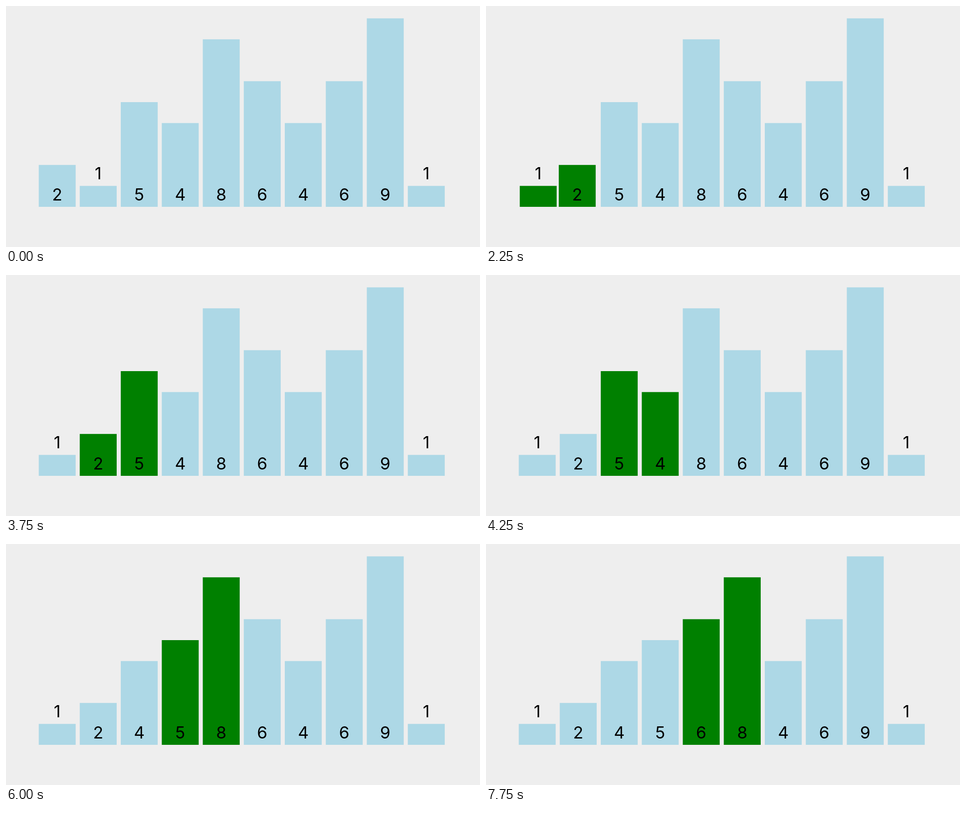
Recreate the animation shown at these times as an HTML page. Size 1049 px wide and 534 px high, loop 8000 ms.

```html
<!DOCTYPE html>
<html lang="en">
<head>
<meta charset="utf-8">
<title>Bubble sort</title>
<style>
  html, body { margin: 0; width: 100%; height: 100%; overflow: hidden; background: #eee; }
  svg { display: block; width: 100%; height: 100%; }
  text { font: 37px Inter, Roboto, sans-serif; text-anchor: middle; }
</style>
</head>
<body>
<svg id="stage" viewBox="0 0 1049 534"></svg>
<script>
const LOOP = 8000, TICK = 250;
const START = 1220, STEP = 870, FADE = 200;
const LEFT = 72.5, PITCH = 90.75, WIDTH = 81.7, BASE = 445, UNIT = 46.4;
const IDLE = [173, 216, 230], ACTIVE = [0, 128, 0];
const values = [2, 1, 5, 4, 8, 6, 4, 6, 9, 1];

// CSS "ease": cubic-bezier(.25, .1, .25, 1)
function ease(x) {
  if (x <= 0) return 0;
  if (x >= 1) return 1;
  const curve = (s, a, b) => 3 * s * (1 - s) ** 2 * a + 3 * s * s * (1 - s) * b + s ** 3;
  let low = 0, high = 1;
  for (let i = 0; i < 24; i++) {
    const mid = (low + high) / 2;
    if (curve(mid, .25, .25) < x) low = mid; else high = mid;
  }
  return curve(low, .1, 1);
}

const svg = document.getElementById('stage');
function add(parent, tag, attrs) {
  const node = document.createElementNS('http://www.w3.org/2000/svg', tag);
  for (const key in attrs) node.setAttribute(key, attrs[key]);
  return parent.appendChild(node);
}

const bars = values.map((value, slot) => {
  const group = add(svg, 'g', {});
  const height = value * UNIT;
  const rect = add(group, 'rect', { y: BASE - height, width: WIDTH, height });
  const label = add(group, 'text', { x: WIDTH / 2, y: value === 1 ? 384 : 431 });
  label.textContent = value;
  return { value, group, rect, moves: [{ at: -LOOP, to: slot }], lights: [{ at: -LOOP, to: 0 }] };
});

// Run the first bubble pass and record when each bar lights up or moves.
function plan() {
  const order = [...bars];
  let time = START, lit = [];
  for (let i = 0; time < LOOP; i++) {
    const pair = [order[i], order[i + 1]];
    lit.filter(bar => !pair.includes(bar)).forEach(bar => bar.lights.push({ at: time, to: 0 }));
    pair.filter(bar => !lit.includes(bar)).forEach(bar => bar.lights.push({ at: time, to: 1 }));
    lit = pair;
    time += STEP;
    if (pair[0].value > pair[1].value) {
      pair[0].moves.push({ at: time, to: i + 1 });
      pair[1].moves.push({ at: time, to: i });
      [order[i], order[i + 1]] = [pair[1], pair[0]];
      time += STEP;
    }
  }
}

function valueAt(track, time) {
  return track.reduce((from, key) => from + (key.to - from) * ease((time - key.at) / FADE), track[0].to);
}

function draw(time) {
  for (const { group, rect, moves, lights } of bars) {
    const light = valueAt(lights, time);
    const color = IDLE.map((c, i) => Math.round(c + (ACTIVE[i] - c) * light));
    rect.setAttribute('fill', `rgb(${color})`);
    group.setAttribute('transform', `translate(${LEFT + PITCH * valueAt(moves, time)} 0)`);
  }
}

plan();
const origin = performance.now();
function frame() {
  const time = (performance.now() - origin) % LOOP;
  draw(Math.floor(time / TICK) * TICK);
  requestAnimationFrame(frame);
}
frame();
</script>
</body>
</html>
```
